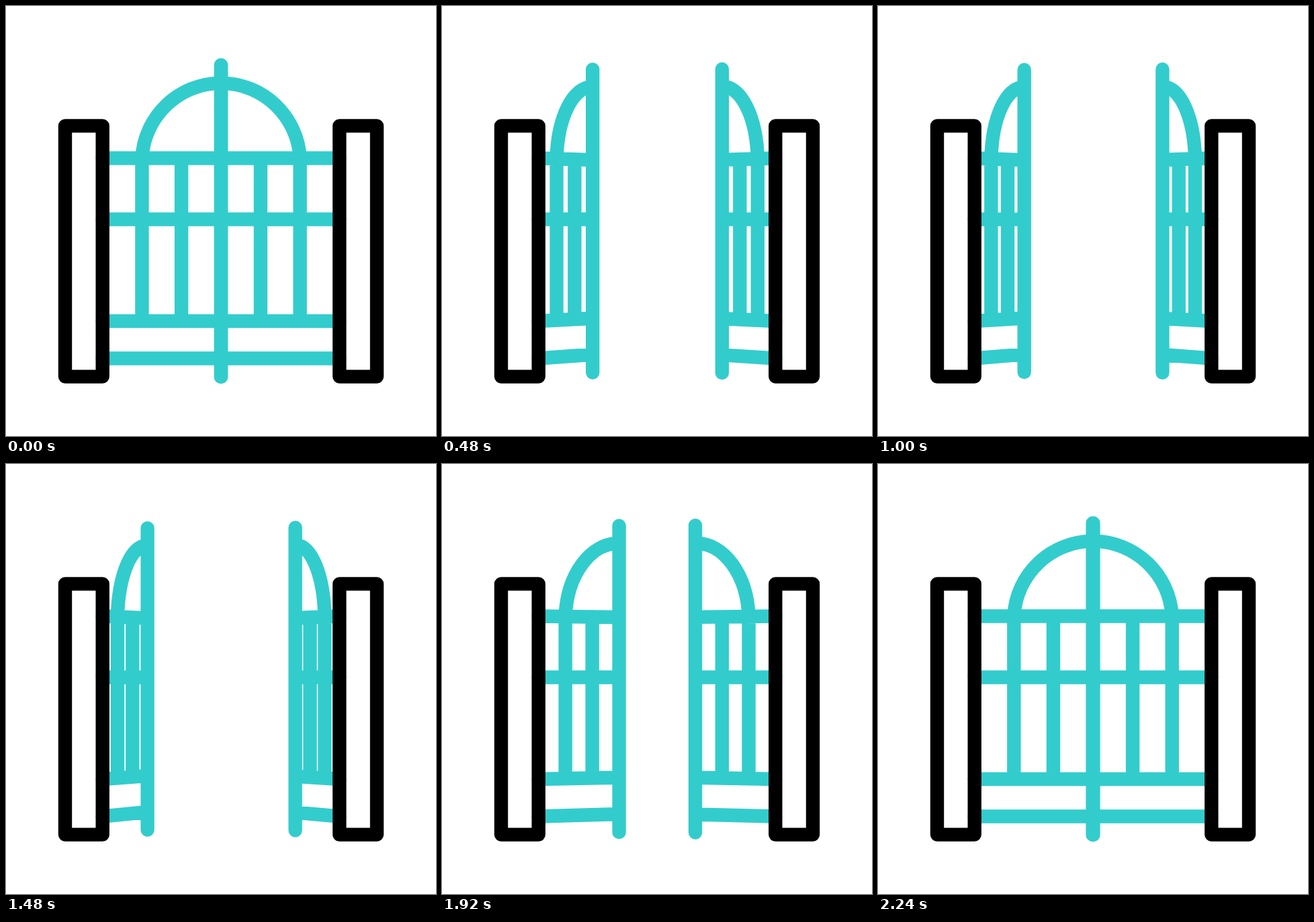
Write an HTML page that moves like this. It is 640x640 px and loops after 2.28 s.

```html
<!DOCTYPE html>
<html lang="en">
<head>
<meta charset="utf-8">
<title>Gate</title>
<style>
  html, body { margin: 0; width: 100%; height: 100%; overflow: hidden; background: #fff; }
  svg { display: block; width: 100%; height: 100%; }
  path, rect { fill: none; stroke-width: 20.4; stroke-linecap: round; stroke-linejoin: round; }
  .gate { stroke: #33cccc; }
  .post { stroke: #000; }
</style>
</head>
<body>
<svg viewBox="0 0 640 640">
  <path class="gate" id="left"/>
  <path class="gate" id="right"/>
  <rect class="post" x="88" y="178.4" width="55.7" height="373.2"/>
  <rect class="post" x="496.3" y="178.4" width="55.7" height="373.2"/>
</svg>
<script>
const LOOP = 2280, STEP = 40, SWING = 1000, CLOSE_AT = 1280;
const MID = 320, RAILS = [226.5, 317.5, 469, 524.5];

// hinge: fixed x, edge: closed x of the free bar, move: its travel, shrink: its height loss
const gates = [
  { el: document.getElementById('left'), hinge: 143.7, edge: 319.8, move: -102.1, shrink: 0.0302 },
  { el: document.getElementById('right'), hinge: 496.3, edge: 320.2, move: 103.2, shrink: 0.027 }
];

const bezier = (t, a, b) => 3 * a * t * (1 - t) ** 2 + 3 * b * t * t * (1 - t) + t ** 3;

// Slow start, fast swing, slight overshoot before settling
function ease(x) {
  if (x <= 0) return 0;
  if (x >= 1) return 1;
  let lo = 0, hi = 1;
  for (let i = 0; i < 30; i++) {
    const t = (lo + hi) / 2;
    if (bezier(t, 0.571, 0.116) < x) lo = t; else hi = t;
  }
  return bezier(lo, 0, 1.42);
}

// u runs from the hinge (0) to the free bar (1)
function gatePath(g, open) {
  const width = g.edge + g.move * open - g.hinge;
  const at = (u, y) => {
    const px = g.hinge + u * width;
    const py = MID + (y - MID) * (1 - g.shrink * open * u);
    return px.toFixed(2) + ' ' + py.toFixed(2);
  };
  const line = (u1, y1, u2, y2) => `M${at(u1, y1)}L${at(u2, y2)}`;
  return RAILS.map(y => line(0, y, 1, y)).join('') +
    [1 / 3, 2 / 3].map(u => line(u, RAILS[0], u, RAILS[2])).join('') +
    line(1, 88, 1, 552) +
    `M${at(1 / 3, RAILS[0])}C${at(0.352, 164.1)} ${at(0.645, 114.9)} ${at(1, 114.9)}`;
}

const start = performance.now();

function draw() {
  const now = Math.max(0, performance.now() - start) % LOOP;
  const t = Math.floor(now / STEP) * STEP;
  const open = ease((t < CLOSE_AT ? t : LOOP - t) / SWING);
  for (const g of gates) g.el.setAttribute('d', gatePath(g, open));
  requestAnimationFrame(draw);
}
draw();
</script>
</body>
</html>
```
